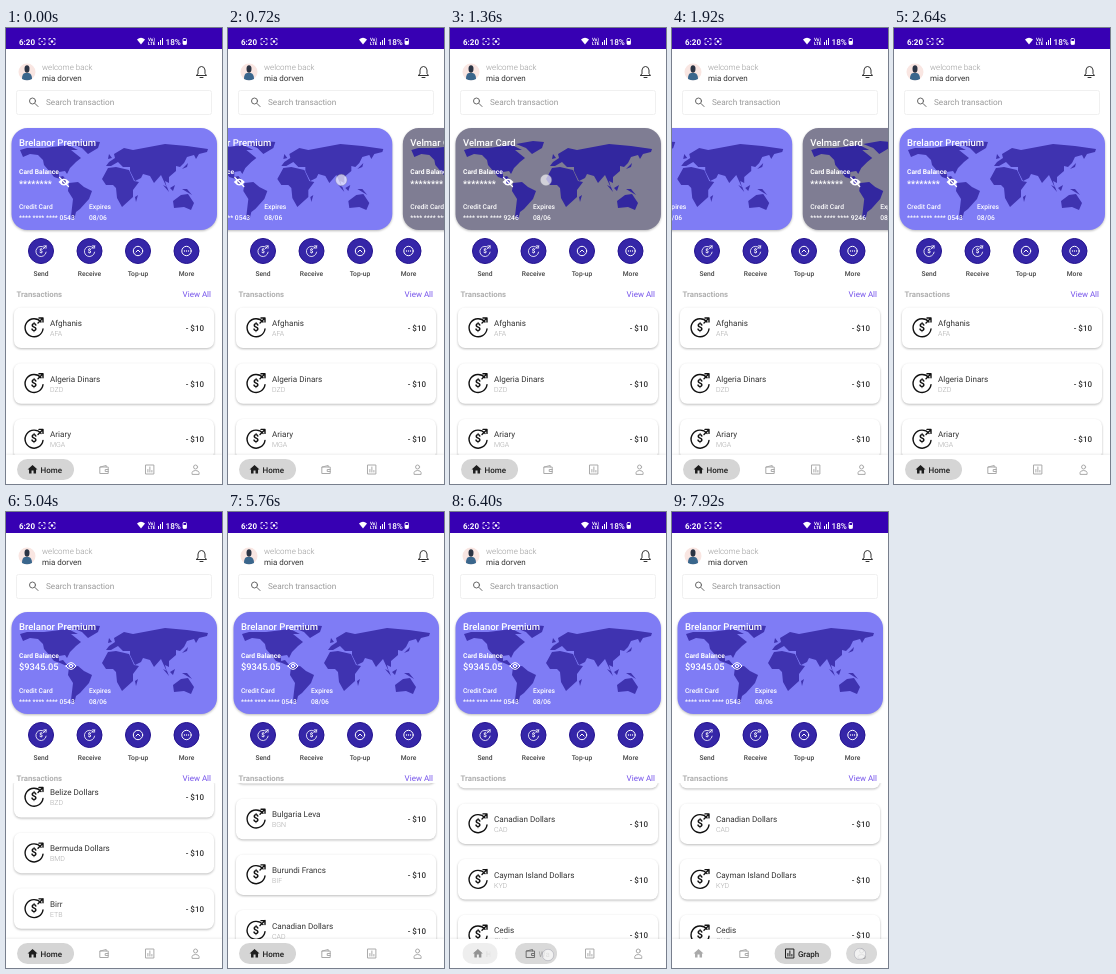
Animation, 216 px wide and 456 px high, one loop 8000 ms. Source, as an HTML page:

```html
<!DOCTYPE html>
<html lang="en">
<head>
<meta charset="utf-8">
<title>Wallet app</title>
<style>
  html, body { margin: 0; width: 100%; height: 100%; overflow: hidden; background: #fff; }
  #stage { display: block; width: 216px; height: 456px; font: 8px Roboto, sans-serif; text-rendering: geometricPrecision; }
  .line { fill: none; stroke: currentColor; stroke-linecap: round; stroke-linejoin: round; }
  .bold { font-weight: 700; }
  .medium { font-weight: 500; }
  .shadow { filter: drop-shadow(0 1px 1px #0004); }
</style>
</head>
<body>
<svg id="stage" viewBox="0 0 216 456">
  <defs>
    <clipPath id="listArea"><path d="M0 271H216V428H0Z"/></clipPath>
    <g id="map">
      <path d="M14 122 21 120 38 120 62 117 72 122 65 122 70 126 75 130 70 134 64 140 61 146 59 143 53 144 53 149 57 148 63 155 54 151 48 149 44 144 38 137 37 132 32 127 24 126 17 129Z"/>
      <path d="M66 116 83 113 94 114 92 120 82 126 76 120Z"/>
      <path d="M63 155 72 154 78 159 86 163 83 171 74 181 70 184 68 192 65 188 67 171 62 163Z"/>
      <path d="M96 151 102 140 110 139 123 142 128 153 133 154 127 162 127 169 116 179 111 170 110 160 107 157 100 157Z"/>
      <path d="M100 138 103 134 109 130 108 126 118 120 127 122 143 119 159 116 181 118 202 121 201 124 193 126 190 131 188 127 181 129 178 135 174 139 170 138 170 143 163 149 163 155 159 153 161 160 155 147 148 155 144 148 137 146 135 150 129 153 124 143 124 139 117 139 112 134 105 138Z"/>
      <path d="M167 173 175 167 182 166 188 175 185 182 178 179 168 180Z"/>
      <path d="M102 131 106 130 103 126ZM176 141 181 139 182 135ZM130 174 132 167 129 169ZM157 157 163 164 161 159ZM164 160 169 157 167 163ZM176 161 186 167 181 161Z"/>
    </g>
    <g id="coin" class="line" stroke-width="1.4">
      <path d="M7 -5A9 9 0 1 0 9 2M4 -4 9 -9M5 -9H9V-5"/>
      <text y="4" text-anchor="middle" font-size="11" class="bold" fill="currentColor" stroke="none">$</text>
    </g>
  </defs>

  <rect width="216" height="456" fill="#fff"/>
  <g fill="#fff" color="#fff">
    <rect width="216" height="21" fill="#3700b3"/>
    <text x="13" y="16.500" class="bold">6:20</text>
    <path class="line" stroke-width=".8" d="M33 12V10.500H34.500M37.500 10.500H39V12M39 15V16.500H37.500M34.500 16.500H33V15M43 12V10.500H44.500M47.500 10.500H49V12M49 15V16.500H47.500M44.500 16.500H43V15"/>
    <circle cx="36" cy="13.500" r=".8"/><circle cx="46" cy="13.500" r="1.300"/>
    <path d="M131 11.500Q135 8 139 11.500L135 16.500Z"/>
    <text x="142" y="13" class="bold" font-size="4.500">Vo)</text>
    <text x="142" y="17" class="bold" font-size="4.500">LTE</text>
    <path d="M152 17V14H153V17ZM154 17V12H155V17ZM156 17V10H157V17Z"/>
    <text x="159.500" y="16.500" class="medium" font-size="8.200">18%</text>
    <rect x="177" y="10.500" width="3.500" height="6" rx="1" class="line" stroke-width=".8"/>
    <path d="M177 13H180.500V16.500H177Z"/>
  </g>

  <circle cx="21" cy="44" r="8.500" fill="#f9e6e2"/>
  <path d="M16 51Q16 45.500 19 45H22.500Q26 45.500 26 51Q21 53.500 16 51Z" fill="#3a668c"/>
  <ellipse cx="21" cy="41" rx="2.500" ry="3.700" fill="#2b3444"/>
  <text x="36" y="42" font-weight="300" fill="#999">welcome back</text>
  <text x="36" y="53" fill="#333">mia dorven</text>
  <path class="line" color="#333" d="M190.500 47.500H200.500L199 45.500V42Q198.500 38.500 195.500 38.500Q192.500 38.500 192 42V45.500ZM194 49.500H197"/>
  <rect x="10.500" y="62.500" width="195" height="24" rx="2" fill="#fff" stroke="#f0f0f0"/>
  <g class="line" color="#666"><circle cx="26.500" cy="73" r="3"/><path d="M29 75.500 32 78.500"/></g>
  <text x="40" y="77" font-size="8.200" fill="#999">Search transaction</text>

  <g id="cards"></g>
  <g id="actions"></g>
  <g clip-path="url(#listArea)"><g id="rows"></g></g>
  <text x="10.500" y="269" class="bold" font-size="7.800" fill="#b0b0b0">Transactions</text>
  <text x="205" y="269" text-anchor="end" fill="#7350ea">View All</text>

  <rect y="427" width="216" height="29" fill="#fff" style="filter:drop-shadow(0 -1px 1px #0001)"/>
  <g id="tabs"></g>
  <circle id="touch" r="5.700" fill="#fff" fill-opacity=".65" stroke="#77778a" stroke-opacity=".3"/>
</svg>
<script>
const $ = id => document.getElementById(id);
const PAGE = 216, ROW = 55.7;

const card = (x, title, digits, color, mapColor, balance) => `
  <g transform="translate(${x})" fill="#fff" color="#fff">
    <rect x="5.500" y="100" width="205.500" height="102" rx="16" fill="${color}" class="shadow"/>
    <use href="#map" fill="${mapColor}"/>
    <text x="13" y="117.500" class="medium" font-size="9.500">${title}</text>
    <text x="13" y="146" class="bold" font-size="6.700">Card Balance</text>
    ${balance}
    <g font-size="6.700" class="medium">
      <text x="13" y="181">Credit Card</text><text x="83" y="181">Expires</text>
      <text x="13" y="192">**** **** **** ${digits}</text><text x="83" y="192">08/06</text>
    </g>
  </g>`;
const eye = x => `<g transform="translate(${x} 154)" class="line">
  <path d="M-5 0Q0 -7 5 0Q0 7 -5 0Z"/><circle r="1.700"/></g>`;
const masked = `<text x="13" y="159" class="medium" font-size="9.300">********</text>
  <path d="M52.500 154Q58 147 63.500 154Q58 161 52.500 154Z"/>
  <circle cx="58" cy="154" r="2" fill="#554bb8"/><path class="line" stroke-width="1.300" d="M53.500 149.500 62.500 158.500"/>`;
const shown = `<text x="13" y="157.500" class="medium" font-size="9.300">$9345.05</text>${eye(65)}`;

$('cards').innerHTML =
  card(0, 'Brelanor Premium', '0543', '#7f7cf5', '#3f33b0', `<g id="masked">${masked}</g><g id="shown">${shown}</g>`) +
  card(PAGE, 'Velmar Card', '9246', '#7f7d93', '#32279f', masked);

const miniCoin = '<use href="#coin" transform="scale(.57)"/>';
const actions = [
  ['Send', miniCoin],
  ['Receive', miniCoin],
  ['Top-up', '<circle r="4.700"/><path d="M-2 1 0 -1 2 1"/>'],
  ['More', '<circle r="4.700"/><path d="M-2 0H-2M0 0H0M2 0H2" stroke-width="1.300"/>']
];
$('actions').innerHTML = actions.map(([label, icon], i) => `
  <g transform="translate(${35 + i * 48.5} 223)">
    <circle r="12.500" fill="#3526a8" stroke="#23128f"/>
    <g class="line" color="#fff">${icon}</g>
    <text y="25" text-anchor="middle" font-size="6.700" class="medium" fill="#444">${label}</text>
  </g>`).join('');

const currencies = `Afghanis AFA|Algeria Dinars DZD|Ariary MGA|Aruba Guilders (also called Florins) AWG|
Australian Dollars AUD|Azerbaijan New Manats AZN|Bahamas Dollars BSD|Bahrain Dinars BHD|Baht THB|Balboa PAB|
Bangladesh Taka BDT|Barbados Dollars BBD|Belarus Rubles BYR|Belize Dollars BZD|Bermuda Dollars BMD|Birr ETB|
Bolivares Fuertes VEF|Bolivianos BOB|Brazil Real BRL|Brunei Darussalam Dollars BND|Bulgaria Leva BGN|
Burundi Francs BIF|Canadian Dollars CAD|Cayman Island Dollars KYD|Cedis GHC`.split('|').map(s => s.trim());
$('rows').innerHTML = currencies.map((entry, i) => `
  <g transform="translate(0 ${279 + i * ROW})">
    <rect x="8" y=".5" width="200" height="40.500" rx="7" fill="#fff" class="shadow"/>
    <use href="#coin" x="28" y="20" color="#111"/>
    <text x="44" y="19" font-size="8.100" fill="#333">${entry.slice(0, -4)}</text>
    <text x="44" y="29" font-size="7" font-weight="300" fill="#aaa">${entry.slice(-3)}</text>
    <text x="198" y="24" text-anchor="end" class="medium" fill="#333">- $10</text>
  </g>`).join('');

const tabs = [
  ['Home', '<path fill="currentColor" stroke="none" d="M-5 0 0 -4.500 5 0H3.500V4H1V1H-1V4H-3.500V0Z"/>'],
  ['Wallet', '<path d="M-4 -2.500 2 -4V-2.500M-4 -2.500H4V4H-4ZM4 0H1V2H4"/>'],
  ['Graph', '<path d="M-4 -4.500H4V4.500H-4ZM-2 2.500V0M0 2.500V-2.500M2 2.500V1"/>'],
  ['Profile', '<circle cy="-2.500" r="2"/><path d="M-3.500 4.500V3Q-3 1 0 1Q3 1 3.500 3V4.500Z"/>']
];
$('tabs').innerHTML = tabs.map(([label, icon]) => `
  <svg y="431" height="21">
    <rect width="100%" height="21" rx="10.500" fill="#d5d5d5"/>
    <g class="line" transform="translate(15.500 10.500)">${icon}</g>
    <svg x="23.500" height="21"><text y="13.500" class="medium" fill="currentColor">${label}</text></svg>
  </svg>`).join('');
const tabViews = [...$('tabs').children];

const progress = (t, from, to) => Math.min(1, Math.max(0, (t - from) / (to - from)));
const ease = (t, from, to) => 1 - (1 - progress(t, from, to) ** 2) ** 3;
const within = (t, from, to) => t >= from && t < to;

const pagePosition = t => ease(t, 520, 1240) - ease(t, 1400, 2440);

// A finger drag followed by a decelerating fling
const scrollPosition = t =>
  160 * progress(t, 4000, 4320) ** 1.85 + 1053.5 * (1 - (1 - progress(t, 4320, 6300)) ** 1.76);

const touches = [
  [400, 800, t => [160 - PAGE * pagePosition(t), 152]],
  [1340, 1800, t => [96 + PAGE * (1 - pagePosition(t)), 152]],
  [2800, 3120, () => [60, 154]],
  [3920, 4330, t => [187, 384 - .87 * scrollPosition(t)]],
  [6160, 6500, () => [98, 443]],
  [6880, 7160, () => [142, 443]],
  [7840, 8000, () => [188, 442]]
];

function drawTabs(t) {
  const open = [
    1 - ease(t, 6200, 6500),
    ease(t, 6200, 6690) - ease(t, 6960, 7260),
    ease(t, 6960, 7410),
    0
  ];
  const pressed = [false, within(t, 6160, 6500), within(t, 6880, 7160), t >= 7840];
  const widths = open.map(a => 31 + 26 * a);
  const gap = (208.7 - widths.reduce((a, b) => a + b)) / 4;
  let x = 3.7 + gap / 2;
  tabViews.forEach((tab, i) => {
    const [pill, , label] = tab.children;
    const shade = 170 - 140 * open[i];
    tab.setAttribute('x', x);
    tab.setAttribute('width', widths[i]);
    tab.style.color = `rgb(${shade},${shade},${shade})`;
    pill.setAttribute('opacity', Math.max(Math.sqrt(open[i]), pressed[i] ? .9 : 0));
    label.setAttribute('width', widths[i] - 31);
    label.setAttribute('opacity', open[i]);
    x += widths[i] + gap;
  });
}

function draw() {
  const t = performance.now() % 8000;
  $('cards').setAttribute('transform', `translate(${-PAGE * pagePosition(t)})`);
  $('rows').setAttribute('transform', `translate(0 ${-scrollPosition(t)})`);
  $('masked').style.display = t < 2960 ? '' : 'none';
  $('shown').style.display = t < 2960 ? 'none' : '';
  drawTabs(t);
  const touch = touches.find(([from, to]) => within(t, from, to));
  $('touch').style.display = touch ? '' : 'none';
  if (touch) $('touch').setAttribute('transform', `translate(${touch[2](t)})`);
  requestAnimationFrame(draw);
}
draw();
</script>
</body>
</html>
```
